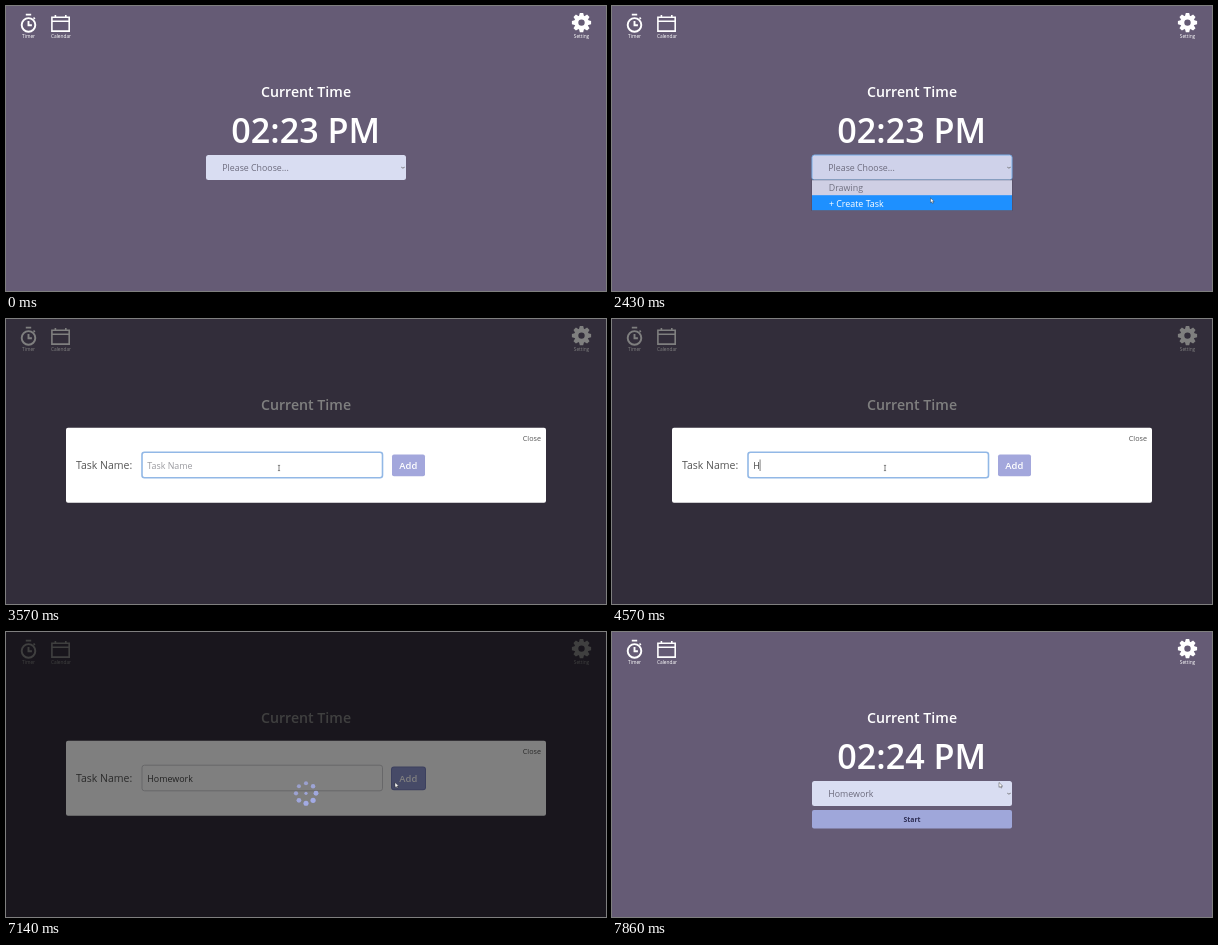
An HTML page for the animation above (8000 ms loop, 600 by 285 pixels).

```html
<!DOCTYPE html>
<html lang="en">
<head>
<meta charset="utf-8">
<title>Task timer</title>
<style>
  html, body { margin: 0; width: 100%; height: 100%; overflow: hidden; background: #655b75; }
  svg { display: block; width: 100%; height: 100%; }
  text { font-family: "Open Sans", "Noto Sans", sans-serif; font-size: 8.8px; white-space: pre; }
  .mid { text-anchor: middle; }
  .tiny { font-size: 4.8px; font-weight: 500; fill: #fff; }
  .semi { font-weight: 600; fill: #fff; }
  .row { font-size: 8.9px; }
</style>
</head>
<body>
<svg viewBox="0 0 600 285">
  <rect width="600" height="285" fill="#655b75"/>

  <g fill="none" stroke="#fff" stroke-width="1.9">
    <circle cx="22.5" cy="18.9" r="6.8"/>
    <path d="M19.8 8.6h5.4M27.6 12.8l1.2-1.1M22.5 15v4.2h3.4"/>
    <path d="M45.9 11.3h17.3v13.8h-17.3zM45.9 15.2h17.3M49.4 9v3M59.8 9v3" stroke-width="1.6"/>
  </g>
  <g id="gear" fill="#fff"></g>
  <text class="tiny mid" x="22.6" y="32">Timer</text>
  <text class="tiny mid" x="55" y="32">Calendar</text>
  <text class="tiny mid" x="575.5" y="32">Setting</text>

  <text class="semi mid" x="300" y="91" style="font-size:14.2px">Current Time</text>
  <text id="clock" class="semi mid" x="299.7" y="136.7" style="font-size:34.2px"></text>

  <rect id="select" x="200" y="149" width="200" height="25" rx="2.5"/>
  <text id="choice" x="216.3" y="165" fill="#6c6b7d"></text>
  <path d="M395.3 161.2l1.6 .9 1.8-.9" fill="none" stroke="#666" stroke-width=".8"/>

  <g id="start">
    <rect x="200" y="178" width="200" height="18.6" rx="2" fill="#9fa7da"/>
    <text class="mid" x="300" y="190" fill="#2f2f55" style="font-size:6.9px;font-weight:700">Start</text>
  </g>

  <g id="menu">
    <rect x="199.7" y="173.4" width="200.6" height="31.6" fill="#000" opacity=".3"/>
    <rect x="200" y="174.2" width="200" height="30" fill="#cfcfe4"/>
    <rect id="hover" x="200" width="200" height="15" fill="#1e90ff"/>
    <text id="item0" class="row" x="216.7" y="185.4">Drawing</text>
    <text id="item1" class="row" x="216.9" y="200.5">+ Create Task</text>
  </g>

  <rect id="shade" width="600" height="285" opacity=".5"/>
  <g id="modal">
    <rect x="60" y="108.7" width="480" height="75" rx="2" fill="#fff"/>
    <text x="516.8" y="122" fill="#555" style="font-size:7.2px">Close</text>
    <text x="70" y="150" fill="#555" style="font-size:10.5px">Task Name:</text>
    <rect id="field" x="136" y="133.2" width="240.5" height="25.6" rx="2.5" fill="#fff"/>
    <text id="entry" class="row" x="141.3" y="149.8"></text>
    <path id="caret" stroke="#444" stroke-width=".7"/>
    <rect id="ring" x="385" y="134.6" width="35" height="23.6" rx="3" fill="#7880bd"/>
    <rect id="add" x="386" y="135.5" width="33" height="21.7" rx="2"/>
    <text class="semi mid" x="402.3" y="149.8" style="font-size:9.4px">Add</text>
  </g>

  <g id="busy">
    <rect width="600" height="285" opacity=".5"/>
    <g id="dots" fill="#a3abe6"></g>
  </g>

  <path id="beam" d="M-1.1-2.6h2.2M0-2.6v5.2M-1.1 2.6h2.2" fill="none" stroke="#666" stroke-width=".8"/>
  <path id="arrow" d="M0 0v4.9l1.2-1 .8 1.7.8-.4-.7-1.6h1.6z" fill="#fff" stroke="#222" stroke-width=".4"/>
</svg>
<script>
const LOOP = 8000, FPS = 7;
const $ = id => document.getElementById(id);
const set = (id, attrs) => { for (const a in attrs) $(id).setAttribute(a, attrs[a]); };
const show = (id, on) => set(id, { visibility: on ? 'visible' : 'hidden' });
const within = (k, a, b) => k >= a && k < b;
const at = (x, y) => `translate(${x} ${y})`;

// [step, x, y] of the pointer tip
const PATH = [
  [1, 345, 4], [6, 318, 158], [10, 318, 162], [14, 318.5, 191.5], [18, 318.5, 192],
  [22, 273, 149], [41, 273, 149], [44, 389, 150.5], [53, 389, 150.5], [54, 387, 150.5]
];
// [step, text] of the typed name
const TYPED = [[0, ''], [32, 'H'], [37, 'Ho'], [38, 'Home'], [39, 'Homewo'], [40, 'Homework']];
const CARET = [[22, 25], [28, 30], [32, 35], [37, 43]];

function buildGear() {
  const teeth = Array.from({ length: 8 }, (_, i) =>
    `<path d="M-2.6-6l.9-3.6h3.4l.9 3.6z" transform="rotate(${i * 45})"/>`).join('');
  $('gear').innerHTML = teeth + '<circle r="5.2" fill="none" stroke="#fff" stroke-width="4"/>';
  set('gear', { transform: at(575.5, 16.6) });
}

function pointer(k) {
  const i = PATH.findIndex(p => p[0] > k);
  if (i < 0) return PATH[PATH.length - 1].slice(1);
  if (i === 0) return PATH[0].slice(1);
  const [a, x, y] = PATH[i - 1], [b, u, v] = PATH[i];
  const s = (k - a) / (b - a), e = s * s * (3 - 2 * s);
  return [x + (u - x) * e, y + (v - y) * e];
}

function drawDots(k) {
  let out = '<circle r="1.6" opacity=".85"/>';
  for (let i = 0; i < 8; i++) {
    const a = i * Math.PI / 4, wave = (1 + Math.cos(a - k * .9)) / 2;
    out += `<circle cx="${10 * Math.cos(a)}" cy="${10 * Math.sin(a)}" r="${2 + wave * .6}" opacity="${.75 + .25 * wave}"/>`;
  }
  $('dots').innerHTML = out;
  set('dots', { transform: at(300, 161.3) });
}

function draw(k) {
  const done = k >= 54, open = within(k, 9, 18), modal = within(k, 18, 54);
  const [x, y] = pointer(k);

  $('clock').textContent = k < 40 ? '02:23 PM' : '02:24 PM';
  $('choice').textContent = done ? 'Homework' : 'Please Choose...';
  set('select', { fill: open ? '#cfd2ea' : '#d9ddf2', stroke: open ? '#79aee8' : 'none' });
  show('start', done);

  const row = y < 174 ? -1 : y < 189.5 ? 0 : 1;
  show('menu', open);
  show('hover', open && row >= 0);
  set('hover', { y: row > 0 ? 189.2 : 174.2 });
  [0, 1].forEach(i => set('item' + i, { fill: row === i ? '#fff' : '#707080' }));

  const zoom = k === 18 || k === 53 ? .8 : k === 19 ? .95 : 1;
  show('shade', modal);
  show('modal', modal);
  set('modal', {
    transform: `${at(540, 183.7)} scale(${zoom}) ${at(-540, -183.7)}`,
    opacity: k === 53 ? .5 : zoom
  });

  const name = TYPED.filter(p => p[0] <= k).pop()[1];
  const focus = within(k, 22, 47), pressed = within(k, 47, 54);
  $('entry').textContent = name || 'Task Name';
  set('entry', { fill: name ? '#444' : '#9a9a9f' });
  set('field', {
    stroke: focus ? '#92b8e6' : '#c4c4c8',
    'stroke-width': focus ? 1.6 : .8
  });
  const end = 141.5 + (name ? $('entry').getComputedTextLength() : 0);
  show('caret', modal && CARET.some(([a, b]) => within(k, a, b)));
  set('caret', { d: `M${end} 140.5v11.5` });
  show('ring', pressed);
  set('add', { fill: pressed ? '#8e95d0' : k >= 44 ? '#949bd4' : '#a3a7dc' });

  const busy = within(k, 48, 53);
  show('busy', busy);
  if (busy) drawDots(k);

  const beam = within(k, 21, 43);
  show('beam', beam);
  show('arrow', k > 0 && !beam);
  set('beam', { transform: at(x, y) });
  set('arrow', { transform: at(x, y) });
}

buildGear();
let last = -1;
function tick(now) {
  const k = Math.floor((now % LOOP + 5) * FPS / 1000) % (LOOP * FPS / 1000);
  if (k !== last) draw(last = k);
  requestAnimationFrame(tick);
}
tick(0);
</script>
</body>
</html>
```
